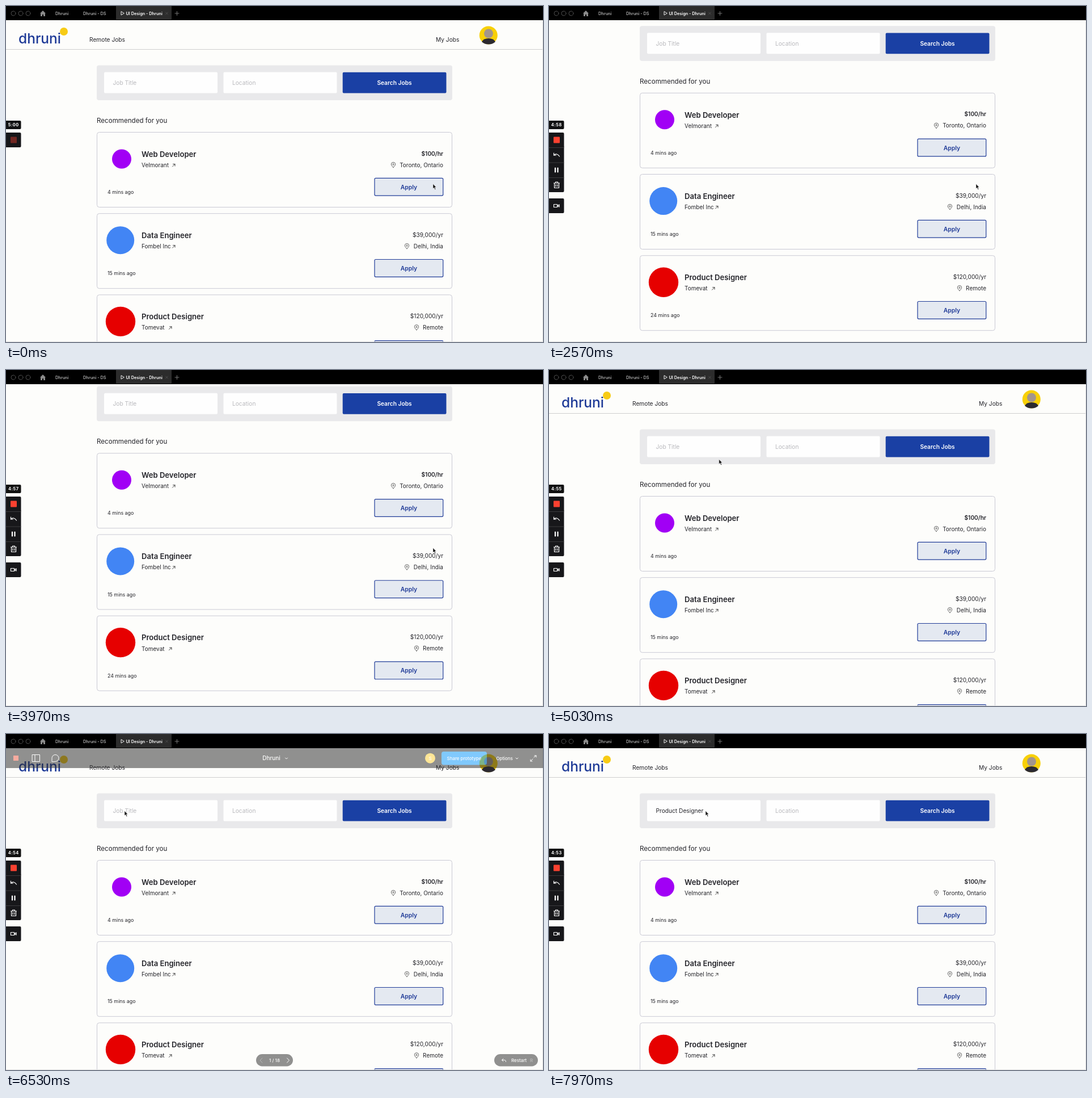
Recreate the animation shown at these times as an HTML page. Size 947x592 px, loop 8000 ms.

```html
<!DOCTYPE html>
<html lang="en">
<head>
<meta charset="utf-8">
<title>Job board walkthrough</title>
<style>
  html, body { margin: 0; height: 100%; overflow: hidden; background: #fdfdfb; }
  svg { display: block; width: 100vw; height: 100vh; font: 10.2px Inter, sans-serif; fill: #24242a; }
  .line { fill: none; stroke: currentColor; stroke-linecap: round; stroke-linejoin: round; }
  .end { text-anchor: end; }
  .mid { text-anchor: middle; }
  .semi { font-weight: 600; }
  .hint { fill: #b9b9bd; }
  .tab { font-size: 7.3px; font-weight: 600; fill: #a9a9a9; }
  .clock { font-size: 7.4px; font-weight: 700; letter-spacing: .5px; fill: #fff; }
</style>
</head>
<body>
<svg viewBox="0 0 947 592">
  <g id="page">
    <path class="line" d="M0 76.5H947" color="#cfcfcf"/>
    <text x="22" y="66" font-size="24.5" font-weight="500" fill="#1e3a97">dhruni</text>
    <circle cx="102" cy="45" r="7" fill="#f7cb15"/>
    <text x="147" y="62.5">Remote Jobs</text>
    <text x="758" y="62.5">My Jobs</text>
    <circle cx="850.8" cy="51.5" r="16" fill="#f8d007"/>
    <path d="M839 63Q842 57 851 57T863 63Q858 67.5 851 67.5T839 63Z" fill="#2c2a30"/>
    <circle cx="851" cy="48.5" r="8" fill="#a3958c"/>

    <rect x="160" y="104.5" width="627" height="61.5" rx="4" fill="#e9e9eb"/>
    <rect x="173" y="116.5" width="200" height="37" rx="2" fill="#fefefe"/>
    <rect x="383.5" y="116.5" width="200" height="37" rx="2" fill="#fefefe"/>
    <rect x="593.7" y="116.8" width="182.8" height="36.6" rx="2" fill="#1a40a4"/>
    <text id="title" x="188.5" y="138.7"></text>
    <text class="hint" x="399" y="138.7">Location</text>
    <text class="semi mid" x="685" y="138.7" style="fill:#fff">Search Jobs</text>
    <text x="160" y="206" font-size="11.6">Recommended for you</text>
    <g id="cards"></g>
  </g>

  <path class="line" d="M946.5 25V591.5H0" color="#e3e3e3"/>

  <g id="viewer">
    <rect y="25" width="947" height="35" fill="#2c2c2c"/>
    <rect x="13" y="38" width="9" height="9" fill="#f2604a"/>
    <g class="line" color="#fff">
      <path d="M46.5 36.5h13v12h-13zM51 36.5v12M81 48.5v-6a6 6 0 1 1 6 6z"/>
      <path d="M492.5 42l2 2 2-2M899 42l2 2 2-2M931 41l4-3m-3 0h3v3M929 44l-4 4m0-3v3h3"/>
    </g>
    <g fill="#fff" font-size="7.9" font-weight="500">
      <text class="mid" x="468" y="46.3" font-size="10">Dhruni</text>
      <circle cx="748" cy="42.7" r="9" fill="#ffd23a"/>
      <text class="mid" x="748" y="45.7">S</text>
      <rect x="768" y="31" width="80" height="23.5" rx="4" fill="#0d99ff"/>
      <text class="mid" x="808" y="45.7">Share prototype</text>
      <text x="864.5" y="45.7">Options</text>
    </g>
    <g fill="#2c2c2c">
      <rect x="441" y="564" width="65" height="21.5" rx="10.7"/>
      <rect x="861" y="564" width="77" height="21.5" rx="10.7"/>
    </g>
    <g fill="#fff" font-size="8" font-weight="500">
      <text class="mid" x="473.5" y="577.8">1 / 18</text>
      <text x="891" y="577.8">Restart</text>
      <text x="924" y="577.8" opacity=".4">R</text>
      <path class="line" color="#777" d="M452 571l-4 4 4 4"/>
      <path class="line" color="#fff" d="M495.5 571l4 4-4 4M877 572l-2.5 2.5 2.5 2.5M874.5 574.5h5q2 0 2 3"/>
    </g>
  </g>

  <rect width="947" height="25" fill="#000"/>
  <rect x="194" width="98" height="24" fill="#2c2c2c"/>
  <g class="line" color="#4c4c4c">
    <circle cx="13" cy="13" r="4"/><circle cx="26" cy="13" r="4"/><circle cx="39" cy="13" r="4"/>
    <path d="M281.5 11l4 4m0-4l-4 4"/>
    <path d="M298 13h7M301.5 9.5v7" color="#777"/>
    <path d="M203 10v6l5-3z" color="#eee"/>
  </g>
  <path d="M60 13l5-5 5 5h-1v5h-3v-3h-2v3h-3v-5z" fill="#8b8b8b"/>
  <text class="tab" x="87" y="15.5">Dhruni</text>
  <text class="tab" x="136" y="15.5">Dhruni - DS</text>
  <text class="tab" x="211.5" y="15.5" style="fill:#fff">UI Design - Dhruni</text>

  <path d="M0 202h24.5q2 0 2 2v11q0 2-2 2H0z" fill="#111"/>
  <text id="clock" class="clock mid" x="13.3" y="212.3"></text>
  <path d="M0 223h24.5q2 0 2 2v22q0 2-2 2H0z" fill="#17171a"/>
  <rect id="stop" x="8" y="230.5" width="11" height="11" rx="1" fill="#fb4130"/>
  <g id="tools">
    <path d="M0 247h26.5v79q0 2-2 2H0zM0 339h24.5q2 0 2 2v22q0 2-2 2H0z" fill="#17171a"/>
    <path class="line" color="#3a3a3d" d="M0 249.5h26M0 276h26M0 302.5h26"/>
    <g class="line" color="#fff" stroke-width="1.2">
      <path d="M8.5 259v4h4M8.5 263q5-5 10 2"/>
      <path d="M11 285.5v7M15.5 285.5v7" stroke-width="2.2"/>
      <path d="M8.5 312h10M11.5 312v-2h4v2M9.5 312v8.5h8V312M12 314.500v3.500M15 314.500v3.500"/>
      <path d="M8.5 349.5h6v5h-6zM14.5 352l3.500-2v4z"/>
    </g>
  </g>

  <path id="cursor" d="M0 0v8.2l1.9-1.6 1.6 3.4 1.3-.6-1.5-3.3h2.5z" fill="#111" stroke="#fff" stroke-width=".5"/>
</svg>
<script>
const $ = id => document.getElementById(id);
const LOOP = 8000;

const jobs = [
  { title: 'Web Developer', firm: 'Velmorant', arrow: 293.5, pay: '$100/hr', place: 'Toronto, Ontario', pin: 683, age: 4, color: '#a100f5', r: 17, cx: 204, bold: 'semi' },
  { title: 'Data Engineer', firm: 'Fombel Inc', arrow: 293.5, pay: '$39,000/yr', place: 'Delhi, India', pin: 707, age: 15, color: '#4285f4', r: 24.5, cx: 201.7 },
  { title: 'Product Designer', firm: 'Tomevat', arrow: 287.5, pay: '$120,000/yr', place: 'Remote', pin: 724, age: 24, color: '#e60000', r: 26.2, cx: 202 }
];

$('cards').innerHTML = jobs.map((job, i) => `
  <g transform="translate(0 ${222.5 + i * 143.2})">
    <rect x="160.5" y="0" width="626" height="132" rx="4" fill="#fdfdfb" stroke="#c9c9d4"/>
    <circle cx="${job.cx}" cy="47" r="${job.r}" fill="${job.color}"/>
    <text class="semi" x="239" y="43.3" font-size="13.1">${job.title}</text>
    <text x="239" y="61.5" font-size="10">${job.firm}</text>
    <path class="line" stroke-width=".9" color="#333" d="M${job.arrow} 60.5l4.5-4.5m-3.5 0h3.5v3.5"/>
    <text x="179" y="108.7" font-size="8.9">${job.age} mins ago</text>
    <text class="end ${job.bold || ''}" x="771" y="41">${job.pay}</text>
    <text class="end" x="771" y="61" font-size="10">${job.place}</text>
    <path class="line" stroke-width=".9" color="#555" d="M${job.pin} 62q-3.7-3.5-3.7-5.5a3.7 3.7 0 0 1 7.4 0q0 2-3.7 5.5zm0-6.5a1.2 1.2 0 1 0 .01 0z"/>
    <rect x="650" y="80.8" width="120.8" height="30.8" rx="2" fill="#e4e9f1" stroke="#213c98" stroke-width="1.2"/>
    <text class="semi mid" x="710.5" y="100.3" font-size="10.4" style="fill:#213c98">Apply</text>
  </g>`).join('');

const progress = (t, from, to) => Math.min(1, Math.max(0, (t - from) / (to - from)));
const easeOut = p => 1 - (1 - p) ** 3;
const smooth = p => p * p * (3 - 2 * p);

// [time, x, y]
const cursorPath = [
  [4470, 753, 313.5], [4600, 690, 290], [4800, 480, 210], [5030, 300, 157.5],
  [5270, 242, 138], [5700, 225, 132], [6100, 214, 134], [6200, 209, 135.5],
  [7200, 209, 135.5], [7400, 246, 135], [7700, 276, 135.5]
];

function cursorAt(t) {
  const next = cursorPath.findIndex(point => point[0] > t);
  if (next < 1) return cursorPath.at(next).slice(1);
  const a = cursorPath[next - 1], b = cursorPath[next];
  const p = progress(t, a[0], b[0]);
  return [1, 2].map(k => a[k] + (b[k] - a[k]) * p);
}

function draw(t) {
  const scroll = 70 * easeOut(progress(t, 2030, 2730))
    + 36 * easeOut(progress(t, 3030, 3430))
    - 106 * smooth(progress(t, 3830, 4230));
  $('page').setAttribute('transform', `translate(0 ${-scroll})`);
  $('cursor').setAttribute('transform', `translate(${cursorAt(t)})`);

  const seconds = 300 - Math.max(0, Math.floor((t - 30) / 1000));
  $('clock').textContent = `${Math.floor(seconds / 60)}:${String(seconds % 60).padStart(2, '0')}`;

  const ready = progress(t, 30, 370);
  $('tools').setAttribute('opacity', ready);
  $('stop').setAttribute('opacity', 0.4 + 0.6 * ready);
  $('viewer').setAttribute('opacity', progress(t, 6370, 6680) - progress(t, 6900, 7200));

  const filled = t >= 7200;
  $('title').textContent = filled ? 'Product Designer' : 'Job Title';
  $('title').classList.toggle('hint', !filled);
}

const start = performance.now();
function frame() {
  draw((performance.now() - start) % LOOP);
  requestAnimationFrame(frame);
}
frame();
</script>
</body>
</html>
```
